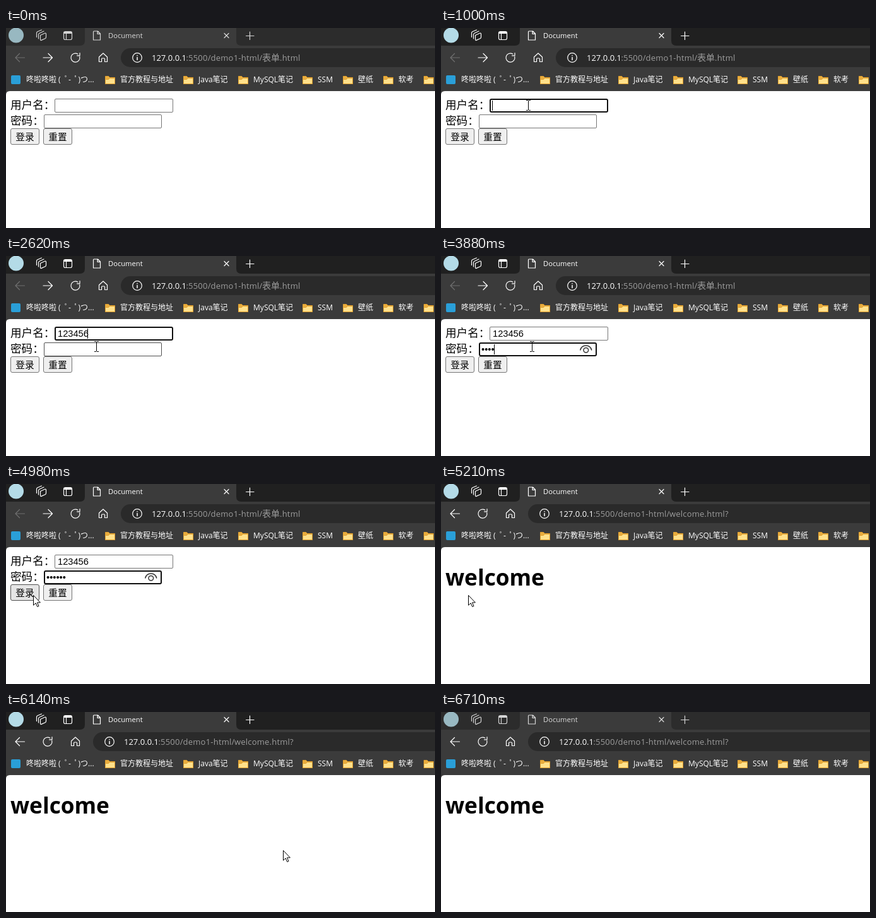
Recreate the animation shown at these times as an HTML page. Size 680 px wide and 317 px high, loop 6750 ms.

```html
<!DOCTYPE html>
<html lang="zh">
<head>
<meta charset="utf-8">
<title>Document</title>
<style>
html, body { margin: 0; width: 100%; height: 100%; overflow: hidden; background: #fff; }
svg { display: block; width: 680px; height: 317px; }
text { font-family: 'Open Sans', 'Noto Sans CJK SC', 'Noto Sans CJK', sans-serif; white-space: pre; }
.line { fill: none; stroke: #fff; stroke-width: 1.2; stroke-linecap: round; stroke-linejoin: round; }
.mark { font-size: 12px; font-weight: 500; fill: #fff; }
.url { font-size: 13px; fill: #9d9d9d; letter-spacing: .21px; }
.host { fill: #fff; font-weight: 500; letter-spacing: 0; }
.cjk { font-size: 14px; letter-spacing: 0; }
.label { font-size: 17.6px; }
.button { font-size: 14.67px; }
.typed { font-family: 'Liberation Sans', Arial, sans-serif; font-size: 14.67px; }
</style>
</head>
<body>
<svg viewBox="0 0 680 317">
  <defs>
    <g id="folder" stroke="#e0a030" stroke-linejoin="round">
      <path d="M.5 1.5H5.500L7.500 3.500H15.500V13.500H.5Z" fill="#e9ad3e"/>
      <path d="M.5 6.500H5.500L7.500 4.500H15.500V13.500H.5Z" fill="#ffe08a"/>
    </g>
  </defs>

  <rect width="680" height="317" fill="#fff"/>
  <path d="M0 0H680V100H6Q0 100 0 106Z" fill="#3b3b3b"/>

  <!-- tab strip -->
  <g id="strip">
    <path d="M0 0H125V20Q125 28 117 28H0Z"/>
    <path d="M365 0H680V28H373Q365 28 365 20Z"/>
  </g>
  <g id="tabs">
    <circle cx="16" cy="11.5" r="12" fill="#b4dbe7"/>
    <g class="line">
      <path d="M54.5 11.500L61.500 8.300Q63.500 7.500 63.500 9.500V14.500Q63.500 16 62 16.700L56 19.400Q54.500 20 54.500 18Z"/>
      <path d="M51.500 17V10.500Q51.500 9 53 8.200L60 5M48.500 14.500V8Q48.500 6.500 50 5.800L56.500 3"/>
      <rect x="91.5" y="5.5" width="13" height="13" rx="2.5"/>
      <path d="M92.500 7.500H103.500" stroke-width="3"/>
      <path d="M95.500 8V18"/>
      <path d="M139.500 5H145.500L149.500 9V19H138.500V6Q138.500 5 139.500 5ZM145 5.200V9.400H149.200"/>
      <path d="M346 8.500L353 15.500M353 8.500L346 15.500M380.500 12.500H393M386.500 6V18.500"/>
    </g>
    <text x="162" y="16" font-size="11.2" font-weight="500" fill="#fff">Document</text>
  </g>

  <!-- toolbar -->
  <path id="back" class="line" d="M29.500 47H15M21.500 40.500L15 47L21.500 53.500"/>
  <path id="forward" class="line" d="M59 47H73.500M67 40.500L73.500 47L67 53.500"/>
  <g id="nav">
    <rect x="182" y="32" width="600" height="30" rx="15" fill="#2a2a2a"/>
    <g class="line">
      <path d="M116.800 45.500A7 7 0 1 1 113.800 41.200M117 39.500V43.800H112.600"/>
      <path d="M147.500 46L154 40L160.500 46V53.500H156.500V49Q156.500 48 155.500 48H152.500Q151.500 48 151.500 49V53.500H147.500Z"/>
      <circle cx="208" cy="47" r="7.3"/>
      <path d="M208 46.500V50.500M208 43.600V43.700" stroke-width="1.5"/>
    </g>
    <text class="url" y="52"><tspan class="host" x="231">127.0.0.1</tspan><tspan x="285.4">:5500/demo1-html/</tspan></text>
    <text class="url" id="formUrl" x="406" y="52"><tspan class="cjk">表单</tspan>.html</text>
    <text class="url" id="welcomeUrl" x="406" y="52">welcome.html?</text>
  </g>
  <rect x="8" y="75" width="15" height="14" rx="2" fill="#2a9fd8"/>
  <text class="mark" x="32" y="86">咚啦咚啦 (  ﾟ-  ﾟ)つ...</text>
  <g id="marks"></g>

  <!-- form page -->
  <g id="form">
    <text class="label" x="7" y="127.5">用户名：</text>
    <text class="label" x="7" y="152.5">密码：</text>
    <rect id="userBox" fill="#fff"/>
    <rect id="passBox" fill="#fff"/>
    <rect id="login" x="7.5" y="159.5" width="45" height="25" rx="2.5"/>
    <rect x="59.5" y="159.5" width="45" height="25" rx="2.5" fill="#efefef" stroke="#767676"/>
    <text class="button" x="15.3" y="177.5">登录</text>
    <text class="button" x="67.3" y="177.5">重置</text>
    <text class="typed" id="userText" x="82" y="128"></text>
    <text class="typed" id="passText" x="64" y="153"></text>
    <g id="eye" class="line" style="stroke:#333;stroke-width:1.5">
      <path d="M220.800 149C223 139.500 236.500 139.500 238.700 149"/>
      <circle cx="229.8" cy="149.2" r="3.8"/>
    </g>
    <rect id="caret" width="1" height="16"/>
  </g>

  <text id="welcome" x="7" y="161" font-size="35.2" font-weight="700">welcome</text>

  <g id="pointer">
    <path id="arrow" d="M.5 .5V16.200L4.200 12.800L6.700 18.500L9 17.500L6.500 11.900H11.400Z" fill="#fff" stroke="#000"/>
    <path id="beam" d="M-3-7.500H0M1-7.500H4M.5-7V8M-3 8.500H0M1 8.500H4" fill="none" stroke="#000"/>
  </g>
</svg>
<script>
const LOOP = 6750;
const $ = id => document.getElementById(id);
const set = (id, attrs) => { for (const k in attrs) $(id).setAttribute(k, attrs[k]); };
const show = (id, on) => set(id, { display: on ? 'inline' : 'none' });

const folders = [[157, '官方教程与地址'], [281, 'Java笔记'], [368, 'MySQL笔记'], [470, 'SSM'], [534, '壁纸'], [598, '软考'], [662, '']];
$('marks').innerHTML = folders.map(([x, name]) =>
  `<use href="#folder" x="${x}" y="75"/><text class="mark" x="${x + 24}" y="86">${name}</text>`).join('');

const USER = { x: 77, y: 112, w: 188, h: 22 };
const PASS = { x: 60, y: 137, w: 187, h: 22 };
const LOGIN = { x: 7, y: 159, w: 46, h: 26 };
const userKeys = [1110, 1340, 1570, 1840, 2100, 2360];
const passKeys = [3160, 3310, 3570, 3880, 4150, 4420];

const linear = u => u, easeOut = u => u * (2 - u), easeIn = u => u ** 1.6;
const smooth = u => u * u * (3 - 2 * u);
// time, x, y, easing towards this point
const path = [
  [80, 436, 273], [300, 138, 122, easeOut],
  [1000, 138, 122], [1070, 139, 122],
  [2400, 139, 122], [2620, 143, 143, smooth],
  [2820, 143, 143], [2890, 144, 143],
  [4150, 144, 143], [4220, 144, 144],
  [4440, 144, 144], [4820, 43, 176, smooth],
  [5240, 43, 176], [5620, 150, 136, easeIn],
  [5770, 188, 122], [5870, 230, 115], [5960, 284, 130],
  [6320, 593, 308], [6360, 593, 308]
];

function pointerAt(t) {
  if (t < path[0][0] || t >= path[path.length - 1][0]) return null;
  const i = path.findIndex(p => t < p[0]);
  const [t0, x0, y0] = path[i - 1], [t1, x1, y1, ease = linear] = path[i];
  const u = ease((t - t0) / (t1 - t0));
  return { x: Math.round(x0 + (x1 - x0) * u), y: Math.round(y0 + (y1 - y0) * u) };
}

const inside = (p, r) => !!p && p.x >= r.x && p.x < r.x + r.w && p.y >= r.y && p.y < r.y + r.h;
const typedCount = (keys, t) => keys.filter(k => t >= k).length;

function drawInput(id, r, focused, hovered) {
  const line = focused ? 2 : 1;
  set(id, {
    x: r.x + line / 2, y: r.y + line / 2, width: r.w - line, height: r.h - line,
    rx: focused ? 2 : 1.5, 'stroke-width': line,
    stroke: focused ? '#101010' : hovered ? '#4f4f4f' : '#767676'
  });
}

function render(t) {
  const active = t >= 540 && t < 6710;
  const onForm = t < 5100;
  const p = pointerAt(t);

  set('strip', { fill: active ? '#202020' : '#2c2c2c' });
  set('tabs', { opacity: active ? 1 : .8 });
  set('back', { style: `stroke:${onForm ? '#707070' : '#fff'}` });
  set('nav', { transform: `translate(${onForm ? 0 : -44})` });
  ['forward', 'form', 'formUrl'].forEach(id => show(id, onForm));
  ['welcome', 'welcomeUrl'].forEach(id => show(id, !onForm));

  const userFocus = t >= 540 && t < 2820, passFocus = t >= 2820 && t < 5020;
  const overUser = inside(p, USER), overPass = inside(p, PASS), overLogin = inside(p, LOGIN);
  drawInput('userBox', USER, userFocus, overUser);
  drawInput('passBox', PASS, passFocus, overPass);
  set('login', {
    fill: t >= 5020 ? '#f5f5f5' : overLogin ? '#e5e5e5' : '#efefef',
    stroke: overLogin ? '#4f4f4f' : '#767676'
  });

  const n = typedCount(userKeys, t), m = typedCount(passKeys, t);
  $('userText').textContent = '123456'.slice(0, n);
  $('passText').textContent = '•'.repeat(m);
  show('eye', m > 0);
  show('caret', userFocus || (passFocus && t < 4820));
  set('caret', userFocus
    ? { x: Math.floor(81 + 8.16 * n), y: 115 }
    : { x: Math.floor(64 + 5.13 * m), y: 140 });

  show('pointer', p);
  if (p) {
    const text = onForm && (overUser || overPass);
    set('pointer', { transform: `translate(${p.x} ${p.y})` });
    show('beam', text);
    show('arrow', !text);
  }
}

const start = performance.now();
function tick() {
  render((performance.now() - start) % LOOP);
  requestAnimationFrame(tick);
}
tick();
</script>
</body>
</html>
```
